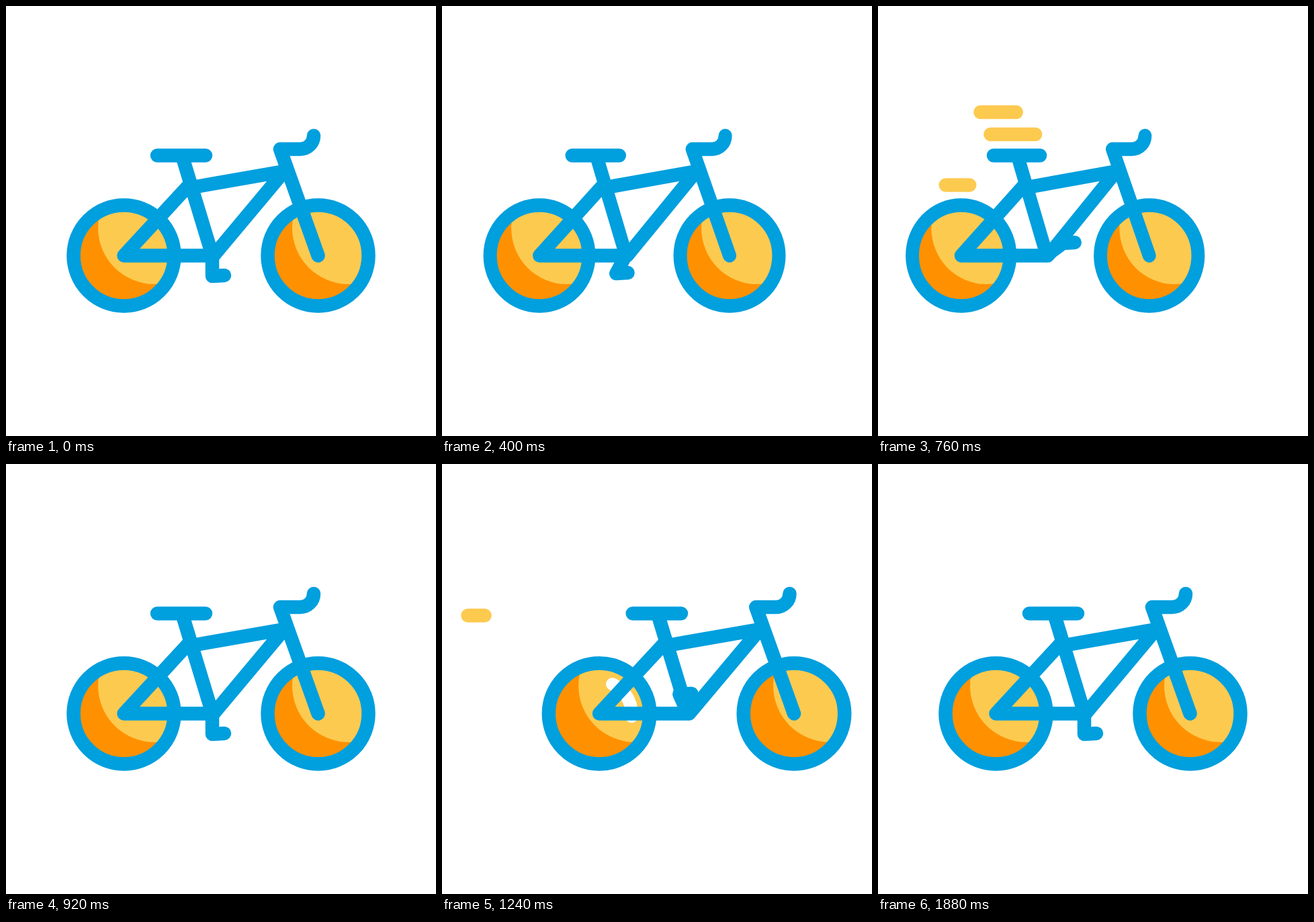
Write an HTML page that moves like this. It is 640 px wide and 640 px high and loops after 2 s.

```html
<!DOCTYPE html>
<html lang="en">
<head>
<meta charset="utf-8">
<title>Bicycle</title>
<style>
  html, body { margin: 0; width: 100%; height: 100%; overflow: hidden; background: #fff; }
  svg { display: block; width: 100vw; height: 100vh; }
  .tube { fill: none; stroke: #009fde; stroke-width: 20.5; stroke-linecap: round; stroke-linejoin: round; }
  #streaks { stroke: #fdca50; stroke-width: 20.5; stroke-linecap: round; }
  #shine { fill: none; stroke: #fff; stroke-width: 19; stroke-linecap: round; }
</style>
</head>
<body>
<svg viewBox="0 0 640 640">
  <defs>
    <clipPath id="disc"><circle r="70"/></clipPath>
    <g id="wheel">
      <g clip-path="url(#disc)">
        <circle r="70" fill="#ff9100"/>
        <circle id="light" cx="45.5" cy="-41.5" r="84" fill="#fdca50"/>
      </g>
      <circle class="tube" r="75"/>
    </g>
  </defs>
  <g id="streaks"></g>
  <g id="bike">
    <use href="#wheel" x="175.5" y="371.5"/>
    <use href="#wheel" x="464.5" y="371.5"/>
    <path id="shine"/>
    <g class="tube">
      <path d="M225 222.5H297M262 222.5L307 371"/>
      <path d="M272 267L175.5 371.5H309L414 246L274 270.5"/>
      <path d="M464.5 371.5L408 213H438C449 213 458 204 458 193"/>
      <path id="crank"/>
    </g>
  </g>
</svg>
<script>
const LOOP = 2000, STEP = 40;
const $ = id => document.getElementById(id);
const clamp = v => Math.min(1, Math.max(0, v));
const mix = (a, b, k) => a + (b - a) * k;

// Smooth curve through [time, value] keys that never overshoots.
function track(keys) {
  const rise = keys.slice(1).map(([t, v], i) => (v - keys[i][1]) / (t - keys[i][0]));
  const slope = keys.map((_, i) => {
    const a = rise[i - 1], b = rise[i];
    return a * b > 0 ? 2 * a * b / (a + b) : 0;
  });
  return t => {
    if (t <= keys[0][0]) return keys[0][1];
    const i = keys.findIndex(k => k[0] >= t) - 1;
    if (i < 0) return keys[keys.length - 1][1];
    const [t0, v0] = keys[i], [t1, v1] = keys[i + 1];
    const d = t1 - t0, u = (t - t0) / d, w = 1 - u;
    return v0 * w * w * (1 + 2 * u) + v1 * u * u * (3 - 2 * u)
      + d * u * w * (slope[i] * w - slope[i + 1] * u);
  };
}

const shift = track([[240, 0], [400, -33.5], [600, -74], [660, -76], [920, 0],
  [1240, 59], [1280, 59], [1360, 56], [1560, 23], [1880, 0]]);
const squash = track([[240, 1], [400, .979], [600, .955], [660, .954], [920, 1],
  [1240, 1.003], [1560, 1]]);
const turn = track([[240, 0], [400, 29], [600, 113], [920, 360], [1240, 516],
  [1560, 678], [1880, 720]]);

// y, from, to, start, end
const streaks = [
  [191, 321, 121, 570, 900],
  [266.5, 176.5, 70, 600, 900],
  [158, 230, 70, 680, 900],
  [225.5, 238.5, 38.5, 960, 1269],
  [158, 300, 100, 960, 1220]
].map(([y, from, to, start, end]) => {
  const line = document.createElementNS("http://www.w3.org/2000/svg", "path");
  $("streaks").append(line);
  return t => {
    const k = (t - start) / (end - start);
    const head = mix(from, to, clamp(k / .75));
    const tail = mix(from, to, clamp((k - .25) / .75));
    line.setAttribute("d", k >= 0 && k < 1 ? `M${head} ${y}L${tail} ${y}` : "");
  };
});

function rim(deg) {
  const a = deg * Math.PI / 180;
  return `${175.5 + 48 * Math.cos(a)} ${371.5 + 48 * Math.sin(a)}`;
}

function drawShine(t) {
  const tail = mix(-66, 5, clamp((t - 1240) / 160));
  const head = mix(-66, 5, clamp((t - 1080) / 160));
  $("shine").setAttribute("d", head > tail ? `M${rim(tail)}A48 48 0 0 1 ${rim(head)}` : "");
}

function drawCrank(t) {
  const a = turn(t) * Math.PI / 180;
  const x = 307 - 31 * Math.sin(a), y = 371 + 31 * Math.cos(a);
  $("crank").setAttribute("d", `M307 371L${x} ${y}l18 -1`);
}

function draw(t) {
  const dx = shift(t), s = squash(t);
  $("bike").setAttribute("transform", `translate(${320 + dx - 320 * s} 0) scale(${s} 1)`);
  $("light").setAttribute("cx", 45.5 + dx * .13);
  drawCrank(t);
  drawShine(t);
  streaks.forEach(streak => streak(t));
}

function tick() {
  const t = (performance.now() + 1) % LOOP;
  draw(Math.floor(t / STEP) * STEP);
  requestAnimationFrame(tick);
}
tick();
</script>
</body>
</html>
```
